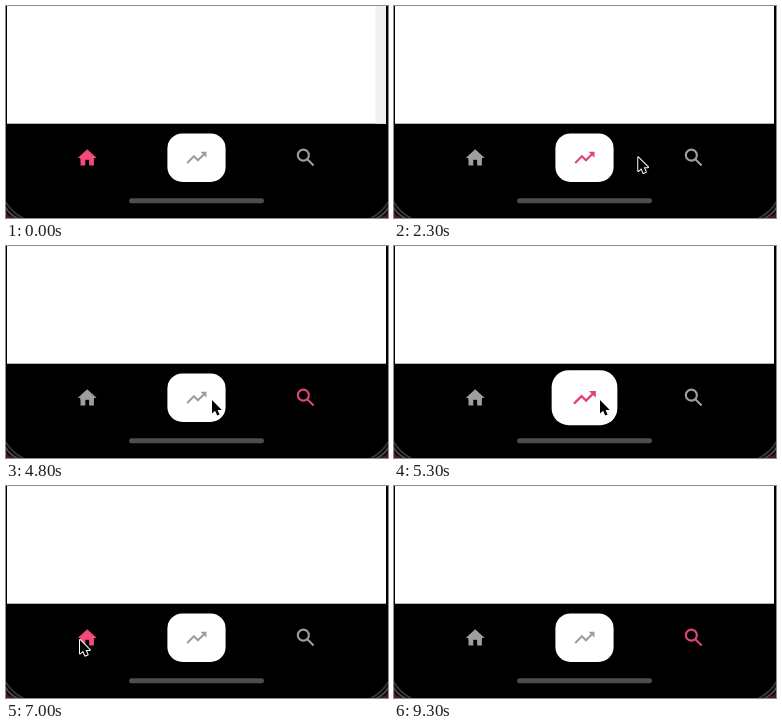
Write an HTML page with a canvas that moves like this. It is 382 px wide and 212 px high and loops after 9400 ms.

```html
<!DOCTYPE html>
<html lang="en">
<head>
<meta charset="utf-8">
<title>Tab bar</title>
<style>
  html, body { margin: 0; width: 100%; height: 100%; overflow: hidden; background: #000; }
  canvas { display: block; width: 382px; height: 212px; }
</style>
</head>
<body>
<canvas id="stage"></canvas>
<script>
const W = 382, H = 212, LOOP = 9400, STEP = 100;
const PINK = '#f34a7b', ROSE = '#dd4673', PALE = '#fd9bb9', GREY = '#9e9e9e';

const canvas = document.getElementById('stage');
const ratio = window.devicePixelRatio || 1;
canvas.width = W * ratio;
canvas.height = H * ratio;
const ctx = canvas.getContext('2d');

// Icons are drawn around their own centre
const tabs = {
  home: { x: 81.2, y: 151.4, tint: PINK, icon: drawHouse },
  trend: { x: 190.5, y: 151.7, tint: ROSE, icon: drawTrend },
  search: { x: 299.6, y: 151.4, tint: ROSE, icon: drawLens }
};

// Each tap: when, which tab, how long the pointer travels there and where its tip rests
const taps = [
  { at: 1401, tab: 'trend', travel: 830, x: 190.5, y: 149.5 },
  { at: 2770, tab: 'search', travel: 600, x: 298, y: 153.3 },
  { at: 4960, tab: 'trend', travel: 340, x: 206, y: 154 },
  { at: 6270, tab: 'home', travel: 420, x: 74, y: 154 },
  { at: 7820, tab: 'search', travel: 650, x: 303, y: 156.5 }
];
const start = { at: -LOOP, tab: 'home', x: 182, y: 214 };
const REST = 170, POINTER_GONE = 8300;

const clamp = v => Math.max(0, Math.min(1, v));
const smooth = p => p * p * (3 - 2 * p);
const mix = (a, b, p) => a + (b - a) * p;

function disc(x, y, r, color) {
  ctx.fillStyle = color;
  ctx.beginPath();
  ctx.arc(x, y, r, 0, Math.PI * 2);
  ctx.fill();
}

function pill(x, y, w, h, r, color) {
  ctx.fillStyle = color;
  ctx.beginPath();
  ctx.roundRect(x - w / 2, y - h / 2, w, h, r);
  ctx.fill();
}

function trace(...points) {
  ctx.beginPath();
  points.forEach(([x, y]) => ctx.lineTo(x, y));
}

function drawHouse() {
  trace([0, -8.1], [9.5, 0.5], [-9.5, 0.5]);
  ctx.fill();
  ctx.fillRect(-6.7, 0, 4.8, 8.1);
  ctx.fillRect(1.9, 0, 4.8, 8.1);
  ctx.fillRect(-6.7, 0, 13.4, 2.4);
}

function drawTrend() {
  trace([-9.3, 5.3], [-2.6, -1.4], [1.4, 2.6], [8, -4]);
  ctx.stroke();
  trace([4, -6], [10, -6], [10, 0]);
  ctx.fill();
}

function drawLens() {
  ctx.beginPath();
  ctx.arc(-2.25, -2.25, 5.5, 0, Math.PI * 2);
  ctx.stroke();
  trace([2, 2], [8, 8]);
  ctx.stroke();
}

function drawIcon(tab, scale, color) {
  ctx.save();
  ctx.translate(tab.x, tab.y);
  ctx.scale(scale, scale);
  ctx.fillStyle = ctx.strokeStyle = color;
  ctx.lineWidth = 2.1;
  tab.icon();
  ctx.restore();
}

function bezel(inset, width, color) {
  ctx.beginPath();
  ctx.moveTo(-2, 193 + inset);
  ctx.quadraticCurveTo(4 - inset / 2, 206 + inset / 2, 20 - inset, 214);
  ctx.lineWidth = width;
  ctx.strokeStyle = color;
  ctx.stroke();
}

function corner() {
  bezel(0, 2, '#353537');
  bezel(5, 2, '#4a4a4c');
  bezel(13, 6, '#4a1826');
}

function phone(t) {
  ctx.fillStyle = '#000';
  ctx.fillRect(0, 0, W, H);
  ctx.fillStyle = '#fff';
  ctx.fillRect(1, 0, 379, 117.7);
  ctx.fillStyle = `rgba(241, 241, 241, ${1 - clamp((t - 600) / 300)})`;
  ctx.fillRect(369.5, 0, 10.5, 117.7);
  corner();
  ctx.save();
  ctx.translate(W, 0);
  ctx.scale(-1, 1);
  corner();
  ctx.restore();
  pill(190.5, 194.7, 135, 5, 2.5, '#4d4d4d');
}

// A disc that grows and hollows out behind the icon
function burst(tab, p) {
  if (p <= 0 || p >= 1) return;
  const r = 27 * (1 - Math.pow(1 - p, 1.6));
  disc(tab.x + 0.4, tab.y + 0.4, r, PALE);
  disc(tab.x + 0.4, tab.y + 0.4, r * clamp((p - 0.35) / 0.6), '#000');
}

function pointer(t) {
  const progress = tap => clamp((t - (tap.at - REST - tap.travel)) / tap.travel);
  if (progress(taps[0]) === 0 || t >= POINTER_GONE) return;
  let { x, y } = start;
  for (const tap of taps) {
    const p = smooth(progress(tap));
    x = mix(x, tap.x, p);
    y = mix(y, tap.y, p);
  }
  ctx.save();
  ctx.translate(x, y);
  trace([0, 0], [0, 13.6], [3.1, 10.8], [5.2, 15.6], [7.6, 14.5], [5.5, 9.9], [9.8, 9.9]);
  ctx.closePath();
  ctx.lineJoin = 'round';
  ctx.lineWidth = 2;
  ctx.strokeStyle = '#fff';
  ctx.stroke();
  ctx.fillStyle = '#000';
  ctx.fill();
  ctx.restore();
}

function draw(t) {
  const tap = [start, ...taps].filter(item => item.at <= t).pop();
  const age = t - tap.at;
  phone(t);

  for (const name in tabs) {
    const tab = tabs[name], active = name === tap.tab;
    let scale = 1;
    if (name === 'trend') {
      if (active) scale += 0.43 * Math.max(0, 1 - Math.abs(age - 200) / 200);
      pill(tab.x, tab.y, 58.2 * scale, 48.6 * scale, 15 * scale, '#fff');
    } else if (active) {
      const p = clamp(age / 290);
      burst(tab, p);
      scale += 0.35 * Math.sin(Math.PI * p);
    }
    drawIcon(tab, scale, active ? tab.tint : GREY);
  }
  pointer(t);
}

function tick() {
  const t = Math.floor((performance.now() % LOOP) / STEP) * STEP;
  ctx.setTransform(ratio, 0, 0, ratio, 0, 0);
  draw(t);
  requestAnimationFrame(tick);
}
tick();
</script>
</body>
</html>
```
